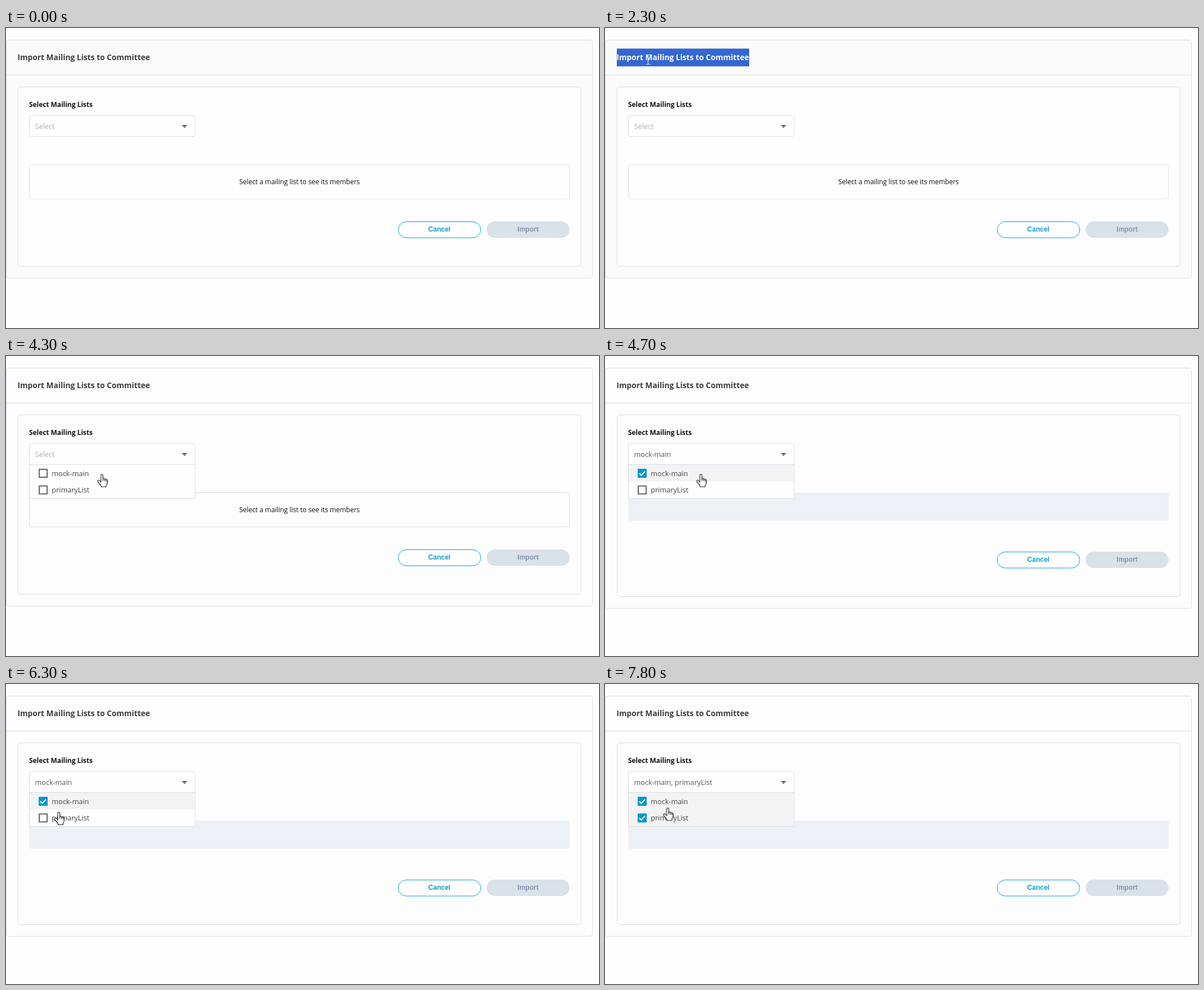
Write an HTML page that moves like this. It is 1053 by 532 pixels and loops after 8000 ms.

```html
<!DOCTYPE html>
<html lang="en">
<head>
<meta charset="utf-8">
<title>Import Mailing Lists</title>
<style>
html, body { margin: 0; width: 100%; height: 100%; overflow: hidden; background: #fefefe; }
svg { display: block; width: 100vw; height: 100vh; }
text { font: 12.65px "Open Sans", sans-serif; fill: #555; }
.title { font-size: 13.75px; font-weight: 700; fill: #3c3c3c; }
.label { font-size: 11.9px; font-weight: 700; fill: #111; }
.note { font-size: 11.9px; fill: #111; text-anchor: middle; }
.button { font: 700 12px "Liberation Sans", Arial, sans-serif; text-anchor: middle; }
.option { fill: #444; }
.hint { fill: #adadad; }
.line { stroke: #d8dee8; }
.white { fill: #fff; }

/* All state changes are hard cuts on one 8 s timeline. */
.panel, .card, .footer, .show, .hide, #cursor, #cursor > * { animation: 8s step-end infinite; }
.show { visibility: hidden; }
.panel { --h: 422px; height: var(--h); fill: #fafafa; animation-name: grow, whiten; }
.card { --h: 318px; height: var(--h); fill: #fefefe; animation-name: grow, whiten; }
.footer { animation-name: drop; }
.word { animation-name: word; }
.all { animation-name: all; }
.open { animation-name: open; }
.closed { animation-name: closed; }
.first { animation-name: first; }
.none { animation-name: none-picked; }
.only { animation-name: only; }
.second { animation-name: second; }
.over { animation-name: over; }
.unticked { animation-name: unticked; }
.shine { animation-name: shine; }
@keyframes grow { 58.75%, 100% { height: calc(var(--h) + 4px); } }
@keyframes whiten { 41.25%, 100% { fill: #fdfdfd; } }
@keyframes drop { 58.75%, 100% { transform: translateY(4px); } }
@keyframes word { 18.75% { visibility: visible; } 21.25%, 100% { visibility: hidden; } }
@keyframes all { 21.25% { visibility: visible; } 32.5%, 100% { visibility: hidden; } }
@keyframes open { 41.25%, 100% { visibility: visible; } }
@keyframes closed { 41.25%, 100% { visibility: hidden; } }
@keyframes first { 58.75%, 100% { visibility: visible; } }
@keyframes none-picked { 58.75%, 100% { visibility: hidden; } }
@keyframes only { 58.75% { visibility: visible; } 92.5%, 100% { visibility: hidden; } }
@keyframes second { 92.5%, 100% { visibility: visible; } }
@keyframes over { 82.5%, 100% { visibility: visible; } }
@keyframes unticked { 92.5%, 100% { visibility: hidden; } }
@keyframes shine { 58.75% { visibility: visible; } 92.5%, 100% { visibility: hidden; } }

.sweep { animation: sweep 2s -1.37s ease-in-out infinite; }
@keyframes sweep { from { transform: translateX(-200px); } to { transform: translateX(1500px); } }

/* Pointer: one hop per step, with a shape that follows what lies below. */
#cursor { transform: translate(112px, -40px); animation-name: hop; }
#cursor > * { visibility: hidden; }
#arrow { animation-name: arrow; }
#beam { animation-name: beam; }
#hand { animation-name: hand; }
#arrow, #hand { fill: #fff; stroke: #222; stroke-width: 1.2; stroke-linejoin: round; }
@keyframes hop {
  1.25% { transform: translate(114px, 1px); }
  2.5% { transform: translate(110px, 32px); }
  3.75% { transform: translate(101px, 62px); }
  5% { transform: translate(85px, 79px); }
  6.25% { transform: translate(62px, 77px); }
  7.5% { transform: translate(42px, 69px); }
  8.75% { transform: translate(27px, 57px); }
  10% { transform: translate(38px, 57px); }
  11.25% { transform: translate(46px, 58px); }
  13.75% { transform: translate(46px, 56px); }
  26.25% { transform: translate(54px, 56px); }
  27.5% { transform: translate(66px, 56px); }
  28.75% { transform: translate(76px, 56px); }
  31.25% { transform: translate(128px, 98px); }
  32.5% { transform: translate(194px, 150px); }
  33.75% { transform: translate(226px, 185px); }
  36.25% { transform: translate(227px, 186px); }
  37.5% { transform: translate(221px, 184px); }
  38.75% { transform: translate(223px, 182px); }
  47.5% { transform: translate(227px, 182px); }
  50% { transform: translate(395px, 226px); }
  51.25% { transform: translate(582px, 252px); }
  52.5% { transform: translate(330px, 238px); }
  53.75% { transform: translate(170.5px, 209.5px); }
  63.75% { transform: translate(330px, 240px); }
  65% { transform: translate(620px, 318px); }
  66.25% { transform: translate(792px, 352px); }
  71.25% { transform: translate(896.5px, 347px); }
  72.5% { transform: translate(880px, 365px); }
  73.75% { transform: translate(745px, 360px); }
  75% { transform: translate(580px, 334px); }
  76.25% { transform: translate(390px, 296px); }
  77.5% { transform: translate(210px, 255px); }
  78.75% { transform: translate(94px, 227px); }
  81.25% { transform: translate(313px, 228px); }
  82.5% { transform: translate(94px, 218px); }
  85% { transform: translate(120px, 224px); }
  86.25% { transform: translate(144px, 235px); }
  87.5% { transform: translate(131.5px, 230.5px); }
  88.75% { transform: translate(129px, 234px); }
  90% { transform: translate(128px, 235px); }
  96.25% { transform: translate(94px, 205px); }
  97.5%, 100% { transform: translate(111.5px, 219.5px); }
}
@keyframes arrow {
  1.25% { visibility: visible; } 8.75% { visibility: hidden; }
  31.25% { visibility: visible; } 33.75% { visibility: hidden; }
  50% { visibility: visible; } 52.5% { visibility: hidden; }
  65% { visibility: visible; } 66.25% { visibility: hidden; }
  71.25% { visibility: visible; } 78.75%, 100% { visibility: hidden; }
}
@keyframes beam {
  8.75% { visibility: visible; stroke: #222; }
  18.75% { visibility: visible; stroke: #fff; }
  31.25%, 100% { visibility: hidden; }
}
@keyframes hand {
  33.75% { visibility: visible; } 50% { visibility: hidden; }
  52.5% { visibility: visible; } 65% { visibility: hidden; }
  66.25% { visibility: visible; } 71.25% { visibility: hidden; }
  78.75%, 100% { visibility: visible; }
}
</style>
</head>
<body>
<svg viewBox="0 0 1053 532">
  <defs>
    <linearGradient id="gleam">
      <stop offset="0" stop-color="#f3f3f4"/>
      <stop offset=".44" stop-color="#f6f7fa"/>
      <stop offset=".44" stop-color="#fcfcfd"/>
      <stop offset=".56" stop-color="#fcfcfd"/>
      <stop offset=".56" stop-color="#f6f7fa"/>
      <stop offset="1" stop-color="#f3f3f4"/>
    </linearGradient>
    <clipPath id="bar"><rect x="41" y="242" width="960" height="50" rx="4"/></clipPath>
    <rect id="box" x="1" y="1" width="14" height="14" fill="#fff" stroke="#666" stroke-width="2"/>
    <g id="tick">
      <rect width="16" height="16" rx="1" fill="#0099cc"/>
      <path d="M3 8.2l3.4 3.4 6.6-7" fill="none" stroke="#fff" stroke-width="2"/>
    </g>
  </defs>

  <rect class="panel line" x=".5" y="21.5" width="1041" rx="4"/>
  <path class="line" d="M0 83.5H1042"/>
  <rect class="card line" x="21.5" y="104.5" width="999.5" rx="4"/>

  <text class="title" x="20.5" y="57">Import Mailing Lists to Committee</text>
  <g class="show word">
    <rect x="21" y="36.5" width="47" height="31.5" fill="#3367d1"/>
    <text class="title white" x="20.5" y="57">Import</text>
  </g>
  <g class="show all">
    <rect x="21" y="36.5" width="235" height="31.5" fill="#3367d1"/>
    <text class="title white" x="20.5" y="57">Import Mailing Lists to Committee</text>
  </g>
  <text class="label" x="41" y="140">Select Mailing Lists</text>

  <g class="hide none">
    <rect class="line" x="41.5" y="242.5" width="959" height="60.5" rx="4" fill="none"/>
    <text class="note" x="521.3" y="277">Select a mailing list to see its members</text>
  </g>
  <g class="show first">
    <rect x="41" y="242" width="960" height="50" rx="4" fill="#edf1f6"/>
  </g>
  <g class="show shine" clip-path="url(#bar)">
    <rect class="sweep" x="48" y="242" width="186" height="50" fill="url(#gleam)"/>
  </g>

  <g class="footer">
    <rect x="696.5" y="343.5" width="146.5" height="28.5" rx="14.25" fill="#fefefe" stroke="#0a9fce"/>
    <text class="button" x="769.5" y="361" style="fill:#0a9fce">Cancel</text>
    <rect x="853.5" y="343" width="147" height="29" rx="14.5" fill="#d9e1e9"/>
    <text class="button" x="927" y="361" style="fill:#8493a8">Import</text>
  </g>

  <rect class="line" x="41.5" y="155" width="294.5" height="37.5" rx="4" fill="#fefefe"/>
  <path d="M312 172h10l-5 5.5z" fill="#707070"/>
  <text class="hide none hint" x="51.8" y="179">Select</text>
  <text class="show only" x="51.5" y="179">mock-main</text>
  <text class="show second" x="51.5" y="179">mock-main, primaryList</text>

  <g class="show open">
    <rect class="line" x="41.5" y="192.5" width="294.5" height="60" fill="#fefefe"/>
    <rect class="show first" x="42" y="193" width="293.5" height="29.5" fill="#f3f3f3"/>
    <rect class="show over" x="42" y="222.5" width="293.5" height="29.5" fill="#f3f3f3"/>
    <use class="hide none" href="#box" x="58" y="200"/>
    <use class="show first" href="#tick" x="58" y="200"/>
    <text class="option" x="81.3" y="213">mock-main</text>
    <use class="show second" href="#tick" x="58" y="229.5"/>
    <text class="option" x="81.3" y="242">primaryList</text>
  </g>
  <g class="show open">
    <g class="hide unticked"><use href="#box" x="58" y="229.5"/></g>
  </g>
  <!-- The first box must stay hidden until the list opens. -->
  <rect class="hide closed" x="42" y="193.5" width="294" height="48.5" fill="#fefefe"/>

  <g id="cursor">
    <path id="arrow" d="M.5.5V16.5L4.2 13 6.8 18.8 9 17.8 6.5 12H11.2z"/>
    <path id="beam" d="M-3 -8.5H-1Q0 -8.5 .5 -7.5Q1 -8.5 2 -8.5H4M.5 -7.5V7.5M-3 8.5H-1Q0 8.5 .5 7.5Q1 8.5 2 8.5H4" fill="none" stroke="#222"/>
    <path id="hand" d="M-2 2.2a1.8 1.8 0 0 1 3.6 0V8q1.6-1.2 3 .6q1.8-1 2.6.8q1.8-.6 2 1.6v4q0 3-2 5v2.5H-1.6v-2L-7 14q-1.5-2.5.2-3.2q1.5-.5 3 1.4L-2 14.4zM1.6 8v4M4.6 8.6v3.6M7.2 9.4v3"/>
  </g>
</svg>
</body>
</html>
```
